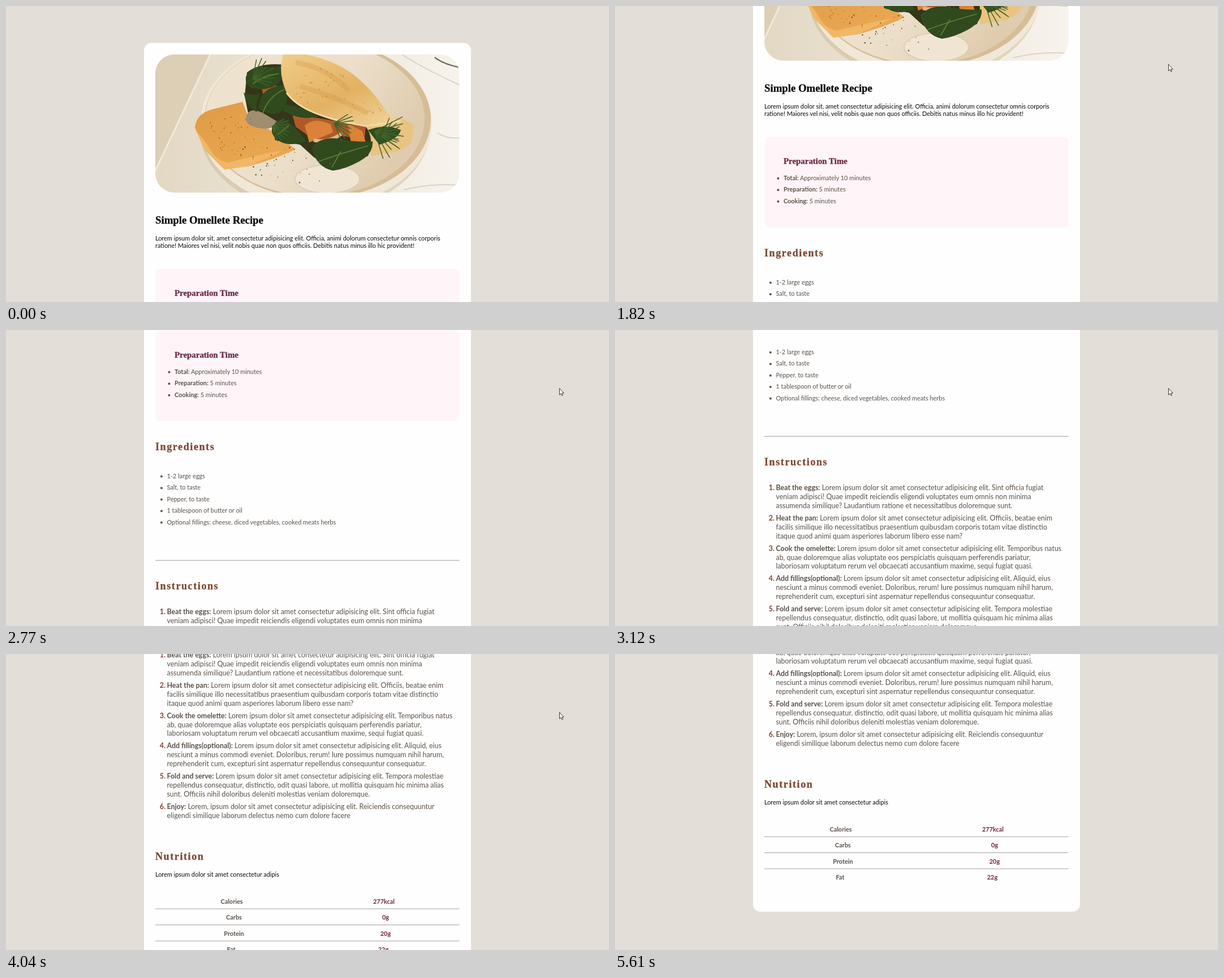
These frames come from a looping animation (1066x525 px, 6340 ms). An HTML page:

```html
<!DOCTYPE html>
<html lang="en">
<head>
<meta charset="utf-8">
<title>Omelette recipe</title>
<style>
  html, body { margin: 0; width: 100%; height: 100%; overflow: hidden; background: #e3ded7; }
  svg { display: block; width: 1066px; height: 525px; }
  text { font: 10.9px Lato, "Open Sans", sans-serif; fill: #0c0a0a; }
  .soft { fill: #5a5148; }
  .step { font-size: 12.4px; fill: #5a5148; }
  .num { font-size: 12.4px; font-weight: 700; fill: #7d4430; text-anchor: end; }
  .cell { font-weight: 700; fill: #5a5148; text-anchor: middle; }
  .value { font-weight: 700; fill: #6e2444; text-anchor: middle; }
  .b { font-weight: 700; }
  .title, .sub, .head { font: 700 18.8px "Liberation Serif", "Noto Serif", serif; stroke: currentColor; stroke-width: .3px; }
  .title { color: #0c0a0a; }
  .sub { font-size: 14.9px; fill: #6b2a45; color: #6b2a45; }
  .head { font-size: 18px; letter-spacing: 1.6px; fill: #7d4731; color: #7d4731; }
</style>
</head>
<body>
<svg viewBox="0 0 1066 525">
  <defs>
    <clipPath id="frame"><rect x="264" y="86" width="537.5" height="245" rx="34"/></clipPath>
    <linearGradient id="marble">
      <stop offset="0" stop-color="#e2d8c4"/><stop offset=".35" stop-color="#eae1d0"/><stop offset="1" stop-color="#f7f3ed"/>
    </linearGradient>
    <linearGradient id="dish" x2="1" y2=".5">
      <stop offset="0" stop-color="#efe4d1"/><stop offset=".6" stop-color="#ecdfca"/><stop offset="1" stop-color="#dfcbad"/>
    </linearGradient>
    <linearGradient id="crepe" x2=".8" y2="1">
      <stop offset="0" stop-color="#efcd88"/><stop offset=".6" stop-color="#e3b163"/><stop offset="1" stop-color="#efcf94"/>
    </linearGradient>
    <linearGradient id="hummus" x2=".6" y2="1">
      <stop offset="0" stop-color="#e09a45"/><stop offset="1" stop-color="#eaa853"/>
    </linearGradient>
  </defs>
  <g id="page">
    <rect x="244" y="65.5" width="578" height="1482.5" rx="13" fill="#fefefe"/>
    <g id="photo" clip-path="url(#frame)">
      <rect x="264" y="86" width="538" height="245" fill="url(#marble)"/>
      <path d="M264 86H360L264 290Z" fill="#dccfb5"/>
      <path d="M361 86L264 292" stroke="#f1e9d9" stroke-width="3"/>
      <g fill="none" stroke="#dcd2c3" stroke-width="2">
        <path d="M758 91Q772 103 802 109" stroke="#776f62" stroke-width="2.5"/>
        <path d="M700 86Q740 112 802 140M762 225Q780 236 802 234M704 326Q750 314 802 318"/>
      </g>
      <ellipse cx="546" cy="214" rx="205" ry="152" fill="#c4ae8a" opacity=".4"/>
      <ellipse cx="548" cy="208" rx="205" ry="150" fill="#f1e7d6"/>
      <ellipse cx="551" cy="201" rx="200" ry="140" fill="#d6bd97"/>
      <ellipse cx="546" cy="200" rx="194" ry="137" fill="url(#dish)"/>
      <ellipse cx="568" cy="307" rx="57" ry="25" fill="#f0e5d3" stroke="#d9c9af" stroke-width="1.5"/>
      <path d="M334 216Q336 192 362 184L418 170 428 196 470 222 512 254Q480 270 430 284L386 290 352 256Z" fill="url(#hummus)"/>
      <path d="M336 222Q352 238 362 256T392 278L440 266 490 256 430 284 386 290 352 256Z" fill="#f0b866"/>
      <path d="M690 198Q718 204 721 214L716 244 694 258 646 266 636 212Z" fill="#e9c381"/>
      <path d="M426 118Q448 100 490 104L496 154 545 188 636 214Q652 234 640 266L578 290 544 268 520 246 476 238 470 214 430 200 422 160Z" fill="#343519"/>
      <path d="M426 192Q434 178 458 192T480 206Q470 222 444 216T426 192Z" fill="#a18d70"/>
      <path d="M452 146Q474 132 496 152L486 168 456 162ZM506 192L560 200 636 214 634 236 590 230 548 240 512 214Z" fill="#b05a28"/>
      <path d="M528 212Q546 196 574 210L578 224 536 242ZM604 208L630 222 636 242 610 244Z" fill="#d98238"/>
      <path d="M544 238Q570 244 594 226" fill="none" stroke="#d9b993" stroke-width="6"/>
      <g fill="#304a1d">
        <path d="M424 126Q432 106 458 108T488 104 486 132Q470 152 436 146Q422 140 424 126Z"/>
        <path d="M446 182Q448 144 490 140Q504 158 492 180T446 182Z"/>
        <path d="M420 154Q436 160 448 156Q440 176 444 188Q428 182 420 154ZM492 174Q528 180 552 196 520 204 490 186Z"/>
        <path d="M470 218Q482 190 502 208T530 240Q500 250 484 240T470 218Z"/>
        <path d="M540 250Q560 230 590 236T648 240Q650 262 624 276T578 292Q548 286 540 250Z"/>
        <path d="M640 220Q672 208 698 220 694 236 660 246Z"/>
      </g>
      <path d="M454 190Q464 160 492 148M552 276Q590 262 640 248M576 286L592 258M480 228L500 212M436 138Q456 124 482 120" fill="none" stroke="#5e7d38" stroke-width="1.8"/>
      <path d="M490 86H530Q588 98 622 128T674 190L698 204Q676 216 636 213 580 208 542 188T496 154Q480 118 490 86Z" fill="url(#crepe)"/>
      <path d="M496 154Q510 174 542 188T636 213L698 204" fill="none" stroke="#f3dba6" stroke-width="3"/>
      <path d="M512 100Q570 110 606 150M520 142Q580 160 640 190" fill="none" stroke="#cf9344" stroke-width="9" opacity=".3"/>
    </g>
    <rect x="264" y="466" width="538" height="161" rx="8" fill="#fff5f9"/>
    <path d="M264 873.5H801.5M264 1415H801.5M264 1443.5H801.5M264 1472H801.5" stroke="#a39f9f"/>
  </g>
  <path id="cursor" d="M.5 .5V12L3.1 9.6 4.8 13.4 6.5 12.6 4.9 8.9H8.2Z" fill="#fff" stroke="#222" stroke-width=".9"/>
</svg>
<script>
const LOOP = 6340;
const page = document.getElementById('page');
const photo = document.getElementById('photo');
const cursor = document.getElementById('cursor');

function add(parent, tag, attrs, html = '') {
  const el = document.createElementNS('http://www.w3.org/2000/svg', tag);
  for (const k in attrs) el.setAttribute(k, attrs[k]);
  el.innerHTML = html;
  parent.append(el);
}
const write = (x, y, cls, html) => add(page, 'text', { x, y, class: cls }, html);
const bold = s => s.replace(/^[^:]+:/, '<tspan class="b">$&</tspan>');
function bullets(x, y, items) {
  items.forEach((s, i) => {
    const base = y + i * 20.43;
    add(page, 'circle', { cx: x - 9.6, cy: base - 3.2, r: 2, fill: '#5a5148' });
    write(x, base, 'soft', s);
  });
}

// Seeded specks and dill fronds for the picture
let seed = 7;
const rand = () => (seed = seed * 16807 % 2147483647) / 2147483647;
function specks(n, cx, cy, rx, ry, fill, size) {
  for (let i = 0; i < n; i++) {
    const a = rand() * 6.283, d = Math.sqrt(rand());
    add(photo, 'circle', { cx: cx + rx * d * Math.cos(a), cy: cy + ry * d * Math.sin(a), r: size * (.4 + rand()), fill });
  }
}
function dill(x, y, turn, size) {
  let d = '';
  for (let i = -4; i <= 4; i++) {
    const a = turn + i * .22, r = size * (.75 + .25 * rand());
    d += `M${x} ${y}l${r * Math.cos(a)} ${r * Math.sin(a)}`;
  }
  add(photo, 'path', { d, stroke: '#3f632a', 'stroke-width': 1.5 });
}
specks(45, 400, 225, 46, 40, '#9a6526', .8);
specks(30, 460, 265, 60, 22, '#6b5230', .9);
specks(16, 510, 290, 80, 26, '#6e624c', 1);
specks(35, 560, 145, 52, 34, '#cb9548', 1.1);
specks(18, 635, 185, 30, 16, '#cb9548', 1);
dill(436, 130, -.5, 42);
dill(470, 214, .3, 34);
dill(580, 208, .3, 36);
dill(652, 222, .4, 56);
dill(664, 232, -.3, 38);

write(264, 385.5, 'title', 'Simple Omellete Recipe');
write(264, 415.7, '', 'Lorem ipsum dolor sit, amet consectetur adipisicing elit. Officia, animi dolorum consectetur omnis corporis');
write(264, 429.4, '', 'ratione! Maiores vel nisi, velit nobis quae non quos officiis. Debitis natus minus illo hic provident!');

write(298, 514, 'sub', 'Preparation Time');
bullets(298, 543, ['Total: Approximately 10 minutes', 'Preparation: 5 minutes', 'Cooking: 5 minutes'].map(bold));

write(264, 678, 'head', 'Ingredients');
bullets(284.5, 728, ['1-2 large eggs', 'Salt, to taste', 'Pepper, to taste', '1 tablespoon of butter or oil',
  'Optional fillings: cheese, diced vegetables, cooked meats herbs']);

write(264, 925, 'head', 'Instructions');
[
  ['Beat the eggs: Lorem ipsum dolor sit amet consectetur adipisicing elit. Sint officia fugiat',
   'veniam adipisci! Quae impedit reiciendis eligendi voluptates eum omnis non minima',
   'assumenda similique? Laudantium ratione et necessitatibus doloremque sunt.'],
  ['Heat the pan: Lorem ipsum dolor sit amet consectetur adipisicing elit. Officiis, beatae enim',
   'facilis similique illo necessitatibus praesentium quibusdam corporis totam vitae distinctio',
   'itaque quod animi quam asperiores laborum libero esse nam?'],
  ['Cook the omelette: Lorem ipsum dolor sit amet consectetur adipisicing elit. Temporibus natus',
   'ab, quae doloremque alias voluptate eos perspiciatis quisquam perferendis pariatur,',
   'laboriosam voluptatum rerum vel obcaecati accusantium maxime, sequi fugiat quasi.'],
  ['Add fillings(optional): Lorem ipsum dolor sit amet consectetur adipisicing elit. Aliquid, eius',
   'nesciunt a minus commodi eveniet. Doloribus, rerum! Iure possimus numquam nihil harum,',
   'reprehenderit cum, excepturi sint aspernatur repellendus consequuntur consequatur.'],
  ['Fold and serve: Lorem ipsum dolor sit amet consectetur adipisicing elit. Tempora molestiae',
   'repellendus consequatur, distinctio, odit quasi labore, ut mollitia quisquam hic minima alias',
   'sunt. Officiis nihil doloribus deleniti molestias veniam doloremque.'],
  ['Enjoy: Lorem, ipsum dolor sit amet consectetur adipisicing elit. Reiciendis consequuntur',
   'eligendi similique laborum delectus nemo cum dolore facere']
].forEach((lines, i) => {
  const y = 969.3 + i * 53.73;
  write(282, y, 'num', i + 1 + '.');
  lines.forEach((s, j) => write(284.5, y + j * 15.75, 'step', j ? s : bold(s)));
});

write(264, 1328, 'head', 'Nutrition');
write(264, 1357.7, '', 'Lorem ipsum dolor sit amet consectetur adipis');
[['Calories', 399, '277kcal', 668], ['Carbs', 403, '0g', 671], ['Protein', 403, '20g', 671], ['Fat', 398, '22g', 667]]
  .forEach(([name, x, value, vx], i) => {
    const y = 1405.5 + i * 28.6;
    write(x, y, 'cell', name);
    write(vx, y, 'value', value);
  });

const smooth = q => q * q * (3 - 2 * q);
const mix = (a, b, q) => a + (b - a) * q;
// Index of the current step in a move of n steps; negative before it starts
const stepAt = (t, from, to, n) => Math.min(n - 1, Math.floor((t - from) / (to - from) * (n - 1) + .1));

// from ms, to ms, steps, scroll start, scroll end, easing power
const scrolls = [
  [1550, 2100, 9, 0, 345, .73],
  [2560, 3120, 9, 345, 685, 1],
  [3320, 3710, 7, 685, 957, .816],
  [4040, 4320, 5, 957, 1091, .8]
];
function scrollAt(t) {
  let y = 0;
  for (const [from, to, n, a, b, power] of scrolls) {
    const i = stepAt(t, from, to, n);
    if (i >= 0) y = mix(a, b, smooth(((i + .34) / (n - .66)) ** power));
  }
  return Math.round(y);
}

function cursorAt(t) {
  const enter = stepAt(t, 650, 1200, 9);
  const nudge = stepAt(t, 4710, 4850, 3);
  const leave = stepAt(t, 5110, 5610, 8);
  if (enter < 0 || leave > 6) return null;
  if (leave >= 0) {
    const q = smooth((leave + 1) / 7), r = 1 - q;
    return [958 * r * r + 1880 * q * r + 999 * q * q, mix(124, 487, q)];
  }
  if (nudge >= 0) return [mix(978, 958, (nudge + 1) / 3), mix(103, 124, (nudge + 1) / 3)];
  const q = smooth(enter / 8);
  return [mix(1042, 978, q), mix(510, 103, q)];
}

function draw(now) {
  const t = now % LOOP;
  page.setAttribute('transform', `translate(0 ${-scrollAt(t)})`);
  const at = cursorAt(t);
  cursor.setAttribute('visibility', at ? 'visible' : 'hidden');
  if (at) cursor.setAttribute('transform', `translate(${at})`);
  requestAnimationFrame(draw);
}
draw(0);
</script>
</body>
</html>
```
